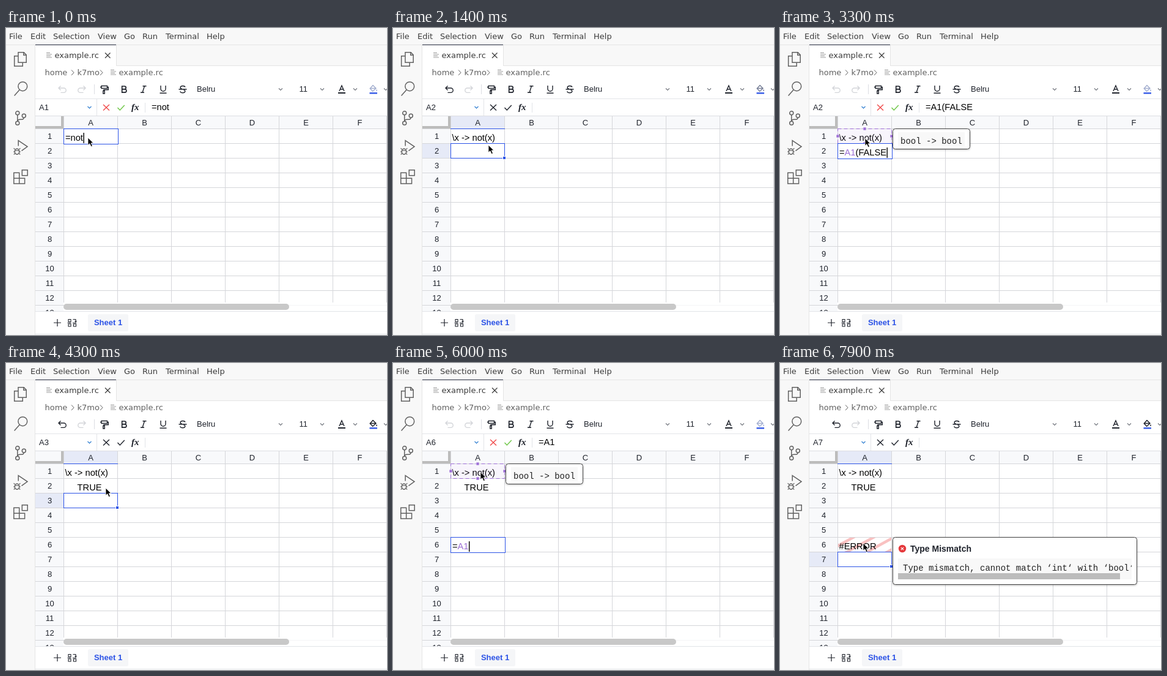
Recreate the animation shown at these times as an HTML page. Size 623x501 px, loop 8000 ms.

```html
<!DOCTYPE html>
<html lang="en">
<head>
<meta charset="utf-8">
<title>Spreadsheet editor</title>
<style>
html, body { margin: 0; width: 100%; height: 100%; overflow: hidden; background: #fff; }
svg { display: block; }
text { white-space: pre; font: 13px "Liberation Sans", sans-serif; fill: #1e222b; }
.ui { font-family: "DejaVu Sans", sans-serif; fill: #3b3b3b; }
.crumb { font-family: "DejaVu Sans", sans-serif; fill: #616161; }
.mid { text-anchor: middle; }
.cell { font-size: 14.667px; fill: #000; }
.mono { font: 14px "Liberation Mono", monospace; fill: #222; }
.bold { font-weight: bold; }
.ico { fill: none; stroke: #1e222b; stroke-width: 1.4; }
.act { fill: none; stroke: #616161; stroke-width: 1.5; }
.thin { fill: none; stroke: #616161; stroke-width: 1; }
</style>
</head>
<body>
<svg id="stage" width="623" height="501" viewBox="0 0 623 501" xmlns="http://www.w3.org/2000/svg"></svg>
<script>
const BLUE = '#2c53e6', INK = '#1e222b', LINE = '#d5d6da', PURPLE = '#9d6fd6';
const LOOP = 8000;

const rect = (x, y, w, h, fill, more = '') =>
  `<rect x="${x}" y="${y}" width="${w}" height="${h}" fill="${fill}" ${more}/>`;
const text = (x, y, s, cls = '', more = '') => `<text x="${x}" y="${y}" class="${cls}" ${more}>${s}</text>`;
const path = (d, cls = 'ico', more = '') => `<path d="${d}" class="${cls}" ${more}/>`;
const at = (x, y, body) => `<g transform="translate(${x} ${y})">${body}</g>`;
const chevron = (x, color = '#70747c', y = 100) =>
  path(`M${x - 3} ${y - 1.5}l3 3l3-3`, 'ico', `style="stroke:${color};stroke-width:1.1"`);
const rowTop = r => 140 + 24 * r;

function frame() {
  const menu = [[5, 'File'], [40, 'Edit'], [77, 'Selection'], [150, 'View'], [193, 'Go'],
    [223, 'Run'], [261, 'Terminal'], [328, 'Help']];
  const listIcon = (x, y) => path(`M${x} ${y}h6M${x} ${y + 2.5}h9M${x} ${y + 5}h7M${x} ${y + 7.5}h9`,
    'thin', 'style="stroke:#9a9a9a"');
  return rect(0, 0, 623, 501, '#f8f8f8') +
    menu.map(([x, s]) => text(x, 18, s, 'ui')).join('') +
    rect(0, 27, 623, 1, '#e5e5e5') + rect(47, 28, 1, 473, '#e5e5e5') +
    rect(48, 61, 575, 1, '#e5e5e5') + rect(48, 62, 575, 439, '#fff') +
    rect(48, 28, 132, 34, '#fff') + rect(180, 28, 1, 34, '#e5e5e5') + rect(48, 27, 132, 1, '#22283c') +
    listIcon(66, 40.5) + text(79.5, 49, 'example.rc', 'ui') +
    path('M162 40.5l8.5 8.5m0-8.5l-8.5 8.5', 'thin', 'style="stroke:#3b3b3b;stroke-width:1.2"') +
    text(63.5, 77, 'home', 'crumb') + path('M107 68.5l4 4.3l-4 4.3', 'thin') +
    text(116.5, 77, 'k7mo', 'crumb') + path('M154 68.5l4 4.3l-4 4.3', 'thin') +
    listIcon(171, 68.5) + text(184.5, 77, 'example.rc', 'crumb');
}

function activityBar() {
  return at(12, 39, path('M8 .8h9.2l4 4v12.4h-13.2zM16.8 .8v4.4h4.4M7.5 6.8h-5.8v16.4h13.5v-5.5', 'act')) +
    at(12, 87, path('M10 14l-8.4 9.4', 'act') + '<circle cx="15.3" cy="8.3" r="7.4" class="act"/>') +
    at(12, 135, '<circle cx="6.8" cy="3.8" r="3" class="act"/><circle cx="17.3" cy="8.3" r="3" class="act"/>' +
      '<circle cx="6.8" cy="20.3" r="3" class="act"/>' +
      path('M6.8 6.8v10.5c.4-2 2-3 4-3h3c2 0 3.3-1 3.5-3', 'act')) +
    at(12, 183, path('M8.2 9.5v-8.8l14.8 9.8l-9.5 6.8', 'act') + '<ellipse cx="6" cy="18.6" rx="3.7" ry="4.6" class="act"/>' +
      path('M2.5 16.8h7M2.6 15.2l-2-2M9.4 15.2l2-2M2.3 19h-2.3M9.7 19h2.3M2.8 21.5l-2 2M9.2 21.5l2 2', 'act', 'style="stroke-width:1.2"')) +
    at(12, 231, path('M14.3 .8h8.9v8.9h-8.9zM.8 5.3h8.9v8.9h8.9v8.9h-17.8zM.8 14.2h8.9v8.9', 'act'));
}

function toolbar() {
  const undo = 'M89.5 94.5l-3.5 3.5l3.5 3.5M86 98h8.5a3.7 3.7 0 0 1 0 7.4h-5';
  return path(undo, 'ico', 'id="undo"') +
    path(undo, 'ico', 'transform="translate(216 0) scale(-1 1)" style="stroke:#d3d5d9"') +
    rect(144, 92, 1, 16, '#dcdee2') +
    path('M156 94.5h9.5v4h-9.5zM156 96.5h-2M165.5 96.5h1.8v4.3h-7.3v1.6M158.8 102.5h2.4v4.5h-2.4z') +
    path('M189.7 95h4a2.4 2.4 0 0 1 0 4.9h-4zM189.7 99.9h4.6a2.6 2.6 0 0 1 0 5.2h-4.6z', 'ico', 'style="stroke-width:1.7"') +
    path('M223.5 94.8h6M220 105.2h6M226.5 94.8l-3.4 10.4') +
    path('M253 94v5.2a4 4 0 0 0 8 0v-5.2M251.5 106.3h11') +
    path('M293 96.5c-.6-1.4-2-2-4-2c-4.6 0-5 4-1.5 4.8M282.5 100h13M290.5 100.8c4 1.2 2.6 5-1.5 5c-2.4 0-3.8-.8-4.3-2.4') +
    text(312, 104, 'Belru') + chevron(449) + text(479.5, 104, '11') + chevron(517) +
    path('M545 103l4-9l4 9M546.5 100h5') + rect(543, 105, 12, 2, INK) + chevron(571) +
    path('M600 93.5l5 5l-5.3 4.8l-4.5-4.6zM595.5 98.5h9M606 100.5v2.5', 'ico', 'id="bucket"') +
    rect(594.5, 105.2, 12.5, 2.3, BLUE) + chevron(621) +
    rect(48, 115, 575, 1, '#e2e4e8') + rect(48, 143, 575, 1, '#dcdee2') + rect(148, 116, 1, 27, '#e2e4e8') +
    text(54, 134, '', '', 'id="name"') + chevron(136.5, '#2a7bd0', 129.5) +
    path('M159 125l10 9.6m0-9.6l-10 9.6', 'ico', 'id="no"') +
    path('M182.5 130l3.8 4l7.5-8', 'ico', 'id="yes"') +
    text(205, 134, 'fx', 'bold', 'style="font-family:\'Liberation Serif\',serif;font-style:italic;font-size:15px"') +
    rect(227, 122, 1, 16, '#e2e4e8') + text(238, 134, '', 'cell', 'id="formula"');
}

function grid() {
  let s = rect(48, 144, 575, 20, '#f8f9fb') + rect(48, 144, 46, 318, '#f8f9fb') +
    rect(95, 144, 87, 20, '#e6eaf7', 'id="colHi"') + rect(48, 0, 46, 23, '#e6eaf7', 'id="rowHi"');
  for (let c = 0; c < 7; c++) {
    s += rect(94 + 88 * c, 144, 1, 304, LINE);
    if (c < 6) s += text(138.5 + 88 * c, 159, 'ABCDEF'[c], 'mid');
  }
  for (let r = 1; r < 14; r++) {
    s += rect(48, rowTop(r), 575, 1, LINE) + text(71.5, rowTop(r) + 17, r, 'mid');
  }
  return s + rect(48, 144, 46, 20, '#f8f9fb') + rect(90, 144, 4, 20, '#bcbcbc') + rect(48, 160, 46, 4, '#bcbcbc');
}

function cells() {
  const stripes = [-24, 9, 42, 75].map(x => `M${90 + x} 314l64-35`).join('');
  return '<clipPath id="errBox">' + rect(95, 285, 87, 23, '#000') + '</clipPath>' +
    `<g id="err"><path d="${stripes}" stroke="#f9c1c1" stroke-width="4.5" clip-path="url(#errBox)"/>` +
    text(96.5, 304, '#ERROR', 'cell') + '</g>' +
    text(96.5, 184, '\\x -&gt; not(x)', 'cell', 'id="fn"') + text(116.6, 208, 'TRUE', 'cell', 'id="res"') +
    '<g id="ref">' + rect(94.5, 164.5, 88, 24, PURPLE, `fill-opacity=".07" stroke="${PURPLE}" stroke-dasharray="6 4"`) +
    [[138, 164], [138, 188], [182, 176], [94, 176]].map(([x, y]) =>
      rect(x - 2, y - 2, 5, 5, PURPLE, 'stroke="#fff" stroke-width=".7"')).join('') + '</g>' +
    '<g id="sel">' + rect(94.5, .5, 88, 24, 'none', `stroke="${BLUE}"`) +
    rect(179.5, 21.5, 5, 5, BLUE, 'stroke="#fff"') + '</g>' + rect(94, 164, 89, 1, BLUE, 'id="colLine"') +
    '<g id="edit">' + rect(94.5, .5, 89, 25, '#fff', `stroke="${BLUE}"`) +
    text(97, 20, '', 'cell', 'id="typed"') + rect(0, 7, 1.4, 17, '#000', 'id="caret"') + '</g>';
}

function bottom() {
  return rect(95, 448, 528, 14, '#fff', 'opacity=".75"') + rect(94, 450, 369, 10, '#c8c8c8', 'rx="5"') +
    rect(48, 462, 575, 39, '#fff') + rect(48, 462, 575, 1, '#e2e4e8') + rect(48, 499, 575, 1, '#e2e4e8') +
    path('M84 475v12M78 481h12', 'ico', 'style="stroke-width:1.2"') +
    path('M102 475.5h4v4h-4zM110.5 483h4v4h-4zM102 483h4v4h-4zM109.5 475.5h4.5v4M112.5 478l1.5 1.8l1.5-1.8M100.5 481.2h6M109 481.2h6', 'ico', 'style="stroke-width:1.1"') +
    rect(134, 467, 66, 28, '#f5f6f8', 'rx="3"') + text(167, 485, 'Sheet 1', 'mid bold', `style="fill:${BLUE}"`);
}

function overlays() {
  const shadow = 'filter="url(#shade)"', edge = 'rx="4" stroke="#454545"';
  return '<filter id="shade" x="-10%" y="-20%" width="120%" height="150%"><feDropShadow dx="0" dy="1" stdDeviation="1.6" flood-opacity=".28"/></filter>' +
    `<g id="hint" ${shadow}>` + rect(95, 191, 247, 98, '#fff', 'rx="6"') + rect(103, 199, 231, 82, '#f3f4f6', 'rx="4"') +
    text(111, 219, 'NOT') + text(111, 241, 'Reverses the logic of its', '', 'style="fill:#7a7f88"') +
    text(111, 261, 'argument', '', 'style="fill:#7a7f88"') + '</g>' +
    `<g id="tip"><g ${shadow}>` + rect(184.5, 164.5, 126, 33, '#fff', edge) + '</g>' +
    rect(193, 170, 109, 23, '#f8f8f8') + text(197, 189, 'bool -&gt; bool', 'mono') + '</g>' +
    '<clipPath id="code">' + rect(193, 318, 382, 36, '#000') + '</clipPath>' +
    `<g id="errTip"><g ${shadow}>` + rect(184.5, 284.5, 399, 77, '#fff', edge) + '</g>' +
    '<circle cx="200" cy="303" r="6.2" fill="#e5383b"/>' +
    path('M197.8 300.8l4.4 4.4m0-4.4l-4.4 4.4', 'ico', 'style="stroke:#fff;stroke-width:1.2"') +
    text(213, 308, 'Type Mismatch', 'bold', 'style="font-size:14px"') + rect(193, 319, 382, 34, '#f8f8f8') +
    text(201, 339, 'Type mismatch, cannot match ‘int‘ with ‘bool‘', 'mono', 'clip-path="url(#code)"') +
    rect(193, 343, 363, 10, '#bcbcbc') + '</g>' +
    '<path id="mouse" d="M0 0v12.2l2.9-2.6l2.3 5l2.2-1l-2.2-4.8h3.8z" fill="#000" stroke="#fff" stroke-width=".8"/>';
}

document.getElementById('stage').innerHTML =
  frame() + activityBar() + toolbar() + grid() + cells() + bottom() + overlays();
const el = {};
document.querySelectorAll('[id]').forEach(n => el[n.id] = n);

// Each entry: start time, row, text being typed (null when only selected).
const steps = [
  [0, 1, '=not'], [1300, 2, null],
  [2000, 2, '='], [2500, 2, '=A1'], [2700, 2, '=A1('], [2800, 2, '=A1(F'], [2900, 2, '=A1(FA'],
  [3000, 2, '=A1(FAL'], [3100, 2, '=A1(FALS'], [3200, 2, '=A1(FALSE'], [3350, 2, '=A1(FALSE)'],
  [3500, 3, null], [4900, 6, null],
  [5000, 6, '='], [6000, 6, '=A1'], [6250, 6, '=A1('], [6450, 6, '=A1(1'], [6600, 6, '=A1(12'],
  [6750, 6, '=A1(12)'], [7150, 7, null]
];
const trail = [
  [0, 134, 179], [600, 134, 179], [1350, 156, 191], [1950, 156, 191], [2400, 139, 180], [3950, 139, 180],
  [4300, 163, 204], [4850, 173, 283], [5000, 173, 285], [5400, 173, 285], [5900, 143, 178],
  [7550, 143, 178], [7850, 136, 294], [LOOP, 136, 294]
];

const show = (node, on) => node.setAttribute('display', on ? 'inline' : 'none');
const within = (t, ...spans) => spans.find(([a, b]) => t >= a && t < b);

function pointer(t) {
  const i = Math.max(1, trail.findIndex(k => k[0] > t));
  const [t0, x0, y0] = trail[i - 1], [t1, x1, y1] = trail[i];
  const u = (t - t0) / (t1 - t0), e = u * u * (3 - 2 * u);
  return [x0 + (x1 - x0) * e, y0 + (y1 - y0) * e];
}

function colored(s) {
  return s.replace(/A1|\d+/g, m => `<tspan fill="${m === 'A1' ? PURPLE : '#2440d8'}">${m}</tspan>`);
}

function update(t) {
  const [since, row, typed] = steps.filter(s => s[0] <= t).pop();
  const editing = typed !== null, top = rowTop(row);
  el.name.textContent = 'A' + row;
  el.formula.textContent = typed || '';
  el.no.style.stroke = editing ? '#f04a4a' : INK;
  el.yes.style.stroke = editing ? '#6cc644' : INK;

  const saved = within(t, [1300, 2300], [3500, 5300], [7150, LOOP]);
  const fade = saved ? Math.min(1, (t - saved[0]) / 300) : 0;
  const mix = (a, b) => Math.round(a + (b - a) * fade);
  el.undo.style.stroke = saved ? INK : '#d3d5d9';
  el.bucket.style.stroke = `rgb(${mix(165, 30)},${mix(176, 34)},${mix(208, 43)})`;

  for (const n of [el.colHi, el.rowHi, el.sel, el.colLine]) show(n, !editing);
  el.rowHi.setAttribute('y', top + 1);
  el.sel.setAttribute('transform', `translate(0 ${top})`);
  show(el.edit, editing);
  if (editing) {
    el.edit.setAttribute('transform', `translate(0 ${top})`);
    el.typed.innerHTML = colored(typed);
    el.caret.setAttribute('x', 97.5 + el.typed.getComputedTextLength());
    show(el.caret, (t - since) % 1000 < 500);
  }
  show(el.ref, editing && typed.includes('A1'));
  show(el.fn, t >= 1300);
  show(el.res, t >= 3500);
  show(el.err, t >= 7150);
  show(el.hint, within(t, [200, 1250]));
  show(el.tip, within(t, [2450, 4050], [5900, 7600]));
  show(el.errTip, t >= 7800);
  el.mouse.setAttribute('transform', `translate(${pointer(t)})`);
}

const start = performance.now();
function tick() {
  update((performance.now() - start) % LOOP);
  requestAnimationFrame(tick);
}
update(0);
requestAnimationFrame(tick);
</script>
</body>
</html>
```
